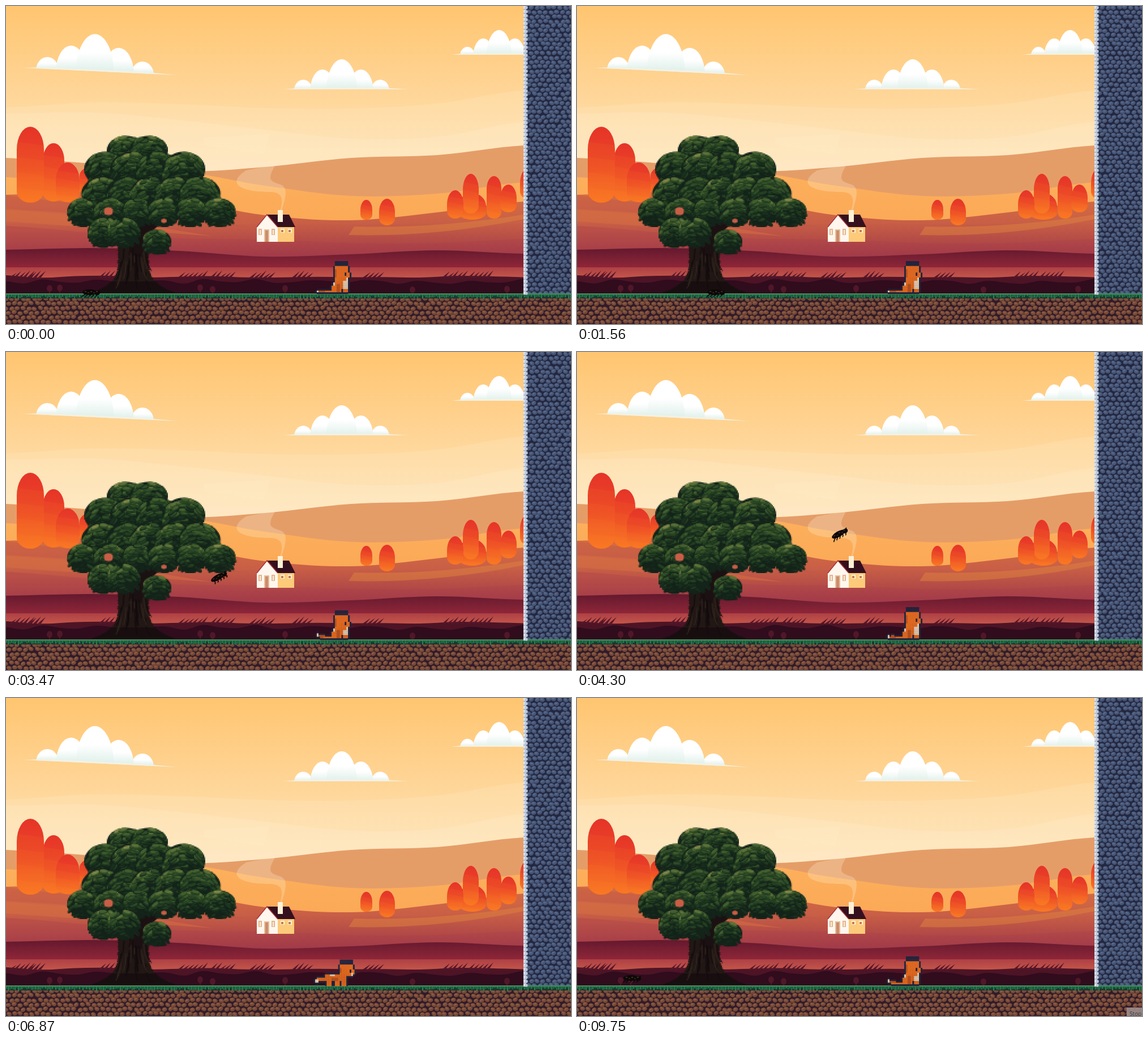
An HTML page with a canvas that plays this animation: 998x561 px, repeating every 9.82 s.

```html
<!DOCTYPE html>
<html lang="en">
<head>
<meta charset="utf-8">
<title>Autumn fox</title>
<style>
html, body { margin: 0; width: 100%; height: 100%; overflow: hidden; background: #2f0c1c; }
canvas { display: block; width: 998px; height: 561px; }
</style>
</head>
<body>
<canvas id="stage" width="998" height="561"></canvas>
<script>
const W = 998, H = 561, FIELD = 914, GRASS = 507, LOOP = 9.82;
const stage = document.getElementById('stage').getContext('2d');

function layer(w, h) {
  const canvas = document.createElement('canvas');
  canvas.width = w;
  canvas.height = h;
  return canvas.getContext('2d');
}

let seed = 7;
function rnd(a = 0, b = 1) {
  seed = (seed * 16807) % 2147483647;
  return a + (b - a) * seed / 2147483647;
}

const scene = layer(W, H);

function fade(y0, y1, ...colors) {
  const g = scene.createLinearGradient(0, y0, 0, y1);
  colors.forEach((c, i) => g.addColorStop(i / (colors.length - 1), c));
  return g;
}

function blob(c, fill, x, y, rx, ry = rx, angle = 0) {
  c.fillStyle = fill;
  c.beginPath();
  c.ellipse(x, y, rx, ry, angle, 0, 7);
  c.fill();
}

function box(c, fill, x, y, w, h) {
  c.fillStyle = fill;
  c.fillRect(x, y, w, h);
}

function poly(c, fill, ...p) {
  c.fillStyle = fill;
  c.beginPath();
  for (let i = 0; i < p.length; i += 2) c.lineTo(p[i], p[i + 1]);
  c.fill();
}

// Smooth slope through evenly spaced heights, filled down to the grass.
function hill(fill, ...heights) {
  const step = FIELD / (heights.length - 1);
  const at = i => heights[Math.max(0, Math.min(heights.length - 1, i))];
  scene.fillStyle = fill;
  scene.beginPath();
  scene.moveTo(0, GRASS);
  scene.lineTo(0, at(0));
  for (let i = 1; i < heights.length; i++) {
    const x = i * step;
    scene.bezierCurveTo(x - step * 2 / 3, at(i - 1) + (at(i) - at(i - 2)) / 6,
      x - step / 3, at(i) - (at(i + 1) - at(i - 1)) / 6, x, at(i));
  }
  scene.lineTo(FIELD, GRASS);
  scene.fill();
}

// Five mounds that shrink away from the middle, on a thin sloping base.
function drawCloud(cx, base, size, slope) {
  const baseAt = x => base + (x - cx) * slope;
  const left = cx - size * 3, right = cx + size * 3.45;
  scene.save();
  scene.beginPath();
  scene.moveTo(left, baseAt(left));
  scene.lineTo(left, 0);
  scene.lineTo(right, 0);
  scene.lineTo(right, baseAt(right));
  scene.clip();
  for (const i of [-2, 2, -1, 1, 0]) {
    const x = cx + i * size, far = Math.abs(i), tall = size * (1.56 - .53 * far), floor = baseAt(x);
    blob(scene, fade(floor - tall, floor, '#fff', '#fff', '#dff0ea'), x, floor + 3, size * (.8 - .16 * far), tall + 3);
  }
  scene.restore();
  poly(scene, '#f4f1e3', left, baseAt(left), cx - size * 2, baseAt(cx - size * 2) - 3,
    cx + size * 2, baseAt(cx + size * 2) - 3, right, baseAt(right));
}

function drawSky() {
  box(scene, fade(0, 290, '#ffc570', '#fee4bb'), 0, 0, W, GRASS);
  hill('#ffefd030', 179, 170, 173, 180, 181, 172, 149);
  hill('#ffefd03c', 190, 188, 201, 218, 234, 231, 204);
  drawCloud(157, 115, 42, .048);
  drawCloud(593, 147, 34, 0);
  drawCloud(871, 86, 28, 0);
}

// `dome` is the share of the height that the rounded top takes.
function redTree(x, y, w, h, dome = .3) {
  scene.fillStyle = fade(y, y + h, '#e63428', '#ea4528', '#f66f23');
  const top = { x: w / 2, y: h * dome }, foot = { x: w / 2, y: h * dome / 2 };
  scene.beginPath();
  scene.roundRect(x, y, w, h, [top, top, foot, foot]);
  scene.fill();
  scene.save();
  scene.clip();
  for (let s = y + h / 5; s < y + h; s += h / 5) {
    poly(scene, '#ff8a2018', x, s, x + w, s + 6, x + w, y + h, x, y + h);
  }
  scene.restore();
}

function drawHills() {
  hill('#e59d68', 268, 278, 292, 284, 268, 263, 246);
  hill(fade(290, 380, '#fdb05c', '#fba957'), 302, 312, 294, 317, 335, 331, 311);
  hill(fade(330, 430, '#d56d42', '#c96046', '#a94147'), 333, 328, 342, 369, 378, 364, 345);
  poly(scene, '#b64c4844', 0, 334, 330, 373, 430, 390, 0, 360);
  poly(scene, '#d7704380', 0, 358, 110, 365, 366, 406, 0, 380);
  scene.fillStyle = '#df813f80';
  scene.beginPath();
  scene.moveTo(FIELD, 368);
  scene.quadraticCurveTo(760, 393, 615, 389);
  scene.lineTo(605, 404);
  scene.quadraticCurveTo(760, 408, FIELD, 376);
  scene.fill();
  hill(fade(395, 440, '#b94f47', '#a33b49'), 388, 400, 410, 412, 418, 418, 411);

  redTree(65, 242, 38, 103);
  redTree(19, 213, 48, 134);
  redTree(130, 285, 34, 48);
  redTree(88, 276, 42, 70, .45);
  redTree(626, 342, 21, 35, .5);
  redTree(659, 340, 28, 47, .5);
  redTree(799, 330, 49, 47, .5);
  redTree(807, 296, 28, 70, .4);
  redTree(779, 325, 29, 50, .5);
  redTree(849, 300, 26, 75);
  redTree(873, 315, 29, 49, .5);
  redTree(908, 287, 25, 53, .5);
}

function drawHouse() {
  scene.fillStyle = '#fff2d444';
  scene.beginPath();
  scene.moveTo(484, 361);
  scene.bezierCurveTo(492, 337, 486, 327, 462, 328);
  scene.bezierCurveTo(408, 327, 392, 311, 424, 290);
  scene.lineTo(476, 280);
  scene.bezierCurveTo(461, 306, 465, 309, 485, 315);
  scene.bezierCurveTo(499, 321, 494, 337, 487, 361);
  scene.fill();
  poly(scene, '#fff2d41c', 348, 232, 466, 226, 456, 261, 352, 246);

  box(scene, '#fcca79', 478, 389, 31, 27);
  poly(scene, '#fff7ee', 443, 416, 443, 390, 461, 368, 480, 390, 480, 416);
  poly(scene, '#34101f', 460, 368, 500, 368, 511, 390, 480, 390);
  scene.strokeStyle = '#a83238';
  scene.lineWidth = 1.5;
  scene.beginPath();
  scene.moveTo(443, 390);
  scene.lineTo(461, 368);
  scene.lineTo(480, 390);
  scene.stroke();
  box(scene, '#fff1d7', 480, 360, 9, 21);
  box(scene, '#e8bd93', 456, 394, 9, 22);
  box(scene, '#ca8c70', 458, 396, 5, 20);
  for (const x of [446, 469]) {
    box(scene, '#e0b694', x, 393, 6, 11);
    box(scene, '#fff1d7', x + 2, 395, 2, 8);
  }
  for (const x of [485, 498]) {
    box(scene, '#fff1d7', x, 393, 7, 7);
    box(scene, '#c47a53', x + 1, 395, 4, 4);
  }
}

function drawMeadow() {
  hill(fade(428, 461, '#65192d', '#7a2034', '#8e2637'), 430, 427, 432, 442, 438, 431, 437);
  box(scene, fade(461, 477, '#ad4045', '#c15349'), 0, 461, W, 18);
  hill('#4d1426', ...Array.from({ length: 16 }, () => rnd(475, 480)));
  for (const start of [5, 40, 163, 303, 360, 430, 505, 630, 770, 815]) {
    const end = start + rnd(20, 45);
    for (let x = start; x < end; x += 8) {
      poly(scene, '#56162a', x, 479, x + 14, 479 - rnd(8, 13), x + 6, 479);
    }
  }
  hill('#300c1d', ...Array.from({ length: 30 }, (_, i) => 486 + 3 * Math.sin(i * 2.1) + rnd(-2, 2)));
  for (const x of [77, 95, 343, 365, 493, 718, 885]) {
    const y = rnd(497, 502);
    blob(scene, '#501729', x, y, 5, 6);
    box(scene, '#501729', x - 1, y, 2, 9);
  }
}

// Staggered pebbles with a lit upper edge.
function stones(x0, y0, x1, y1, dark, body, light) {
  box(scene, dark, x0, y0, x1 - x0, y1 - y0);
  scene.save();
  scene.beginPath();
  scene.rect(x0, y0, x1 - x0, y1 - y0);
  scene.clip();
  for (let row = 0, y = y0 + 3; y < y1 + 5; y += 8, row++) {
    for (let x = x0 + (row % 2) * 5; x < x1 + 6; x += 10) {
      const px = x + rnd(-1, 1), py = y + rnd(-1.3, 1.3), angle = rnd(-.6, .6);
      blob(scene, body, px, py, 4.6, 3.7, angle);
      blob(scene, light, px - .8, py - 1, 2.8, 1.5, angle);
    }
  }
  scene.restore();
}

function drawGround() {
  stones(0, 514, W, H, '#2f1b2a', '#754836', '#8c5b44');
  box(scene, '#183b32', 0, GRASS, W, 9);
  for (let x = 0; x < W; x += 3) {
    box(scene, x % 2 ? '#2e8350' : '#26704a', x, GRASS, 2, rnd(4, 10));
  }
  box(scene, '#3d9258', 0, GRASS, W, 2);
  stones(918, 0, W, GRASS, '#23273f', '#465575', '#57678a');
  box(scene, '#aeb9cc', FIELD, 0, 5, GRASS);
  for (let y = 0; y < GRASS; y += 7) {
    box(scene, '#dce2eb', FIELD, y, 4, 5);
    blob(scene, '#bdc8d9', 919, y + 3, 2.6, 2.7);
  }
}

const GREENS = ['#14241a', '#1a301e', '#243f21', '#324f28', '#435f2f', '#5c7138', '#7d8446'];

// Leaves fan out from the crown of each clump and brighten towards its top.
function drawClump(c, x, y, rx, ry) {
  blob(c, GREENS[0], x, y, rx, ry);
  const count = rx * 2;
  for (let i = 0; i < count; i++) {
    const dy = 1 - 2 * i / count, dx = rnd(-1, 1) * Math.sqrt(1 - dy * dy);
    const light = 2.7 - dy * 2.3 - dx * .6 + rnd(-1.3, 1.3);
    const shade = Math.max(0, Math.min(6, Math.floor(light)));
    const px = x + dx * rx * .95, py = y + dy * ry * .92, angle = dx * 1.1;
    blob(c, GREENS[Math.max(0, shade - 2)], px, py + 2, 8, 3, angle);
    blob(c, GREENS[shade], px, py, 7, 2.6, angle);
  }
}

function drawOak() {
  const oak = layer(155, 145);
  oak.scale(.5, .5);
  oak.translate(-100, -222);
  for (let y = 424; y < 506; y += 2) {
    const half = 27 + 52 * ((y - 424) / 82) ** 5 + rnd(-1, 1);
    box(oak, y < 485 ? '#211714' : '#180e10', 225 - half, y, half * 2, 2);
  }
  oak.strokeStyle = '#1b1112';
  oak.lineWidth = 22;
  for (const [x, y] of [[200, 355], [245, 350], [286, 362]]) {
    oak.beginPath();
    oak.moveTo(228, 440);
    oak.quadraticCurveTo(236, 390, x, y);
    oak.stroke();
  }
  oak.lineWidth = 2;
  for (let i = 0; i < 24; i++) {
    const x = rnd(201, 248), y = rnd(425, 470);
    oak.strokeStyle = i % 3 ? '#120b0d' : '#30231d';
    oak.beginPath();
    oak.moveTo(x, y);
    oak.quadraticCurveTo(x, y + 20, x + (x - 224) * .4, y + 32);
    oak.stroke();
  }
  blob(oak, GREENS[0], 245, 318, 85, 55);
  const rows = [
    { y: 255, from: 212, to: 252, n: 2, rx: 34, ry: 26 },
    { y: 288, from: 176, to: 314, n: 4, rx: 38, ry: 31 },
    { y: 331, from: 170, to: 342, n: 5, rx: 37, ry: 29 },
    { y: 363, from: 137, to: 376, n: 6, rx: 29, ry: 24 },
    { y: 399, from: 173, to: 208, n: 2, rx: 29, ry: 25 },
    { y: 415, from: 267, to: 267, n: 1, rx: 25, ry: 20 }
  ];
  for (const { y, from, to, n, rx, ry } of rows) {
    for (let i = 0; i < n; i++) drawClump(oak, from + (to - from) * i / Math.max(1, n - 1), y, rx, ry);
  }
  oak.globalCompositeOperation = 'destination-out';
  blob(oak, '#000', 181, 362, 8, 7);
  blob(oak, '#000', 279, 379, 5, 4);
  scene.imageSmoothingEnabled = false;
  scene.drawImage(oak.canvas, 100, 222, 310, 290);
}

drawSky();
drawHills();
drawHouse();
drawMeadow();
drawGround();
drawOak();

const INK = '#20243c', FUR = '#df691f', RUST = '#b85220', CREAM = '#e2cbb0';
const CELL = 2.9;

const part = (color, x, y, rx, ry) => ({ color, x, y, rx, ry });
const covers = (p, x, y) => ((x - p.x) / p.rx) ** 4 + ((y - p.y) / p.ry) ** 4 < 1;

// Rasterises rounded parts to coarse cells and inks the cells along their edge.
function drawPixels(parts) {
  const solid = parts.filter(p => p.color !== INK);
  const near = (x, y) => solid.some(p => covers(p, x, y));
  for (let row = 0; row < 20; row++) {
    for (let col = -2; col < 25; col++) {
      const x = col + .5, y = row + .5;
      const hit = parts.findLast(p => covers(p, x, y));
      const edge = near(x - 1, y) || near(x + 1, y) || near(x, y + 1) || near(x, y - 1);
      if (hit || edge) box(stage, hit ? hit.color : INK, 549 + col * CELL, 450 + row * CELL, CELL + .2, CELL + .2);
    }
  }
}

function foxHead(x, y, tall) {
  const ears = [-3, -1, 1, 3].map(dx => part(INK, x + dx, y - tall - 1, .6, 1.6));
  return [
    part(FUR, x, y, 4.2, tall),
    part(FUR, x + 4, y + 1, 1, 1.6),
    part(RUST, x - 3.5, y, .6, tall - 2),
    part(INK, x + 2.5, y + .5, .6, 1.1),
    part(CREAM, x + 3.5, y + tall - 1.5, .6, 1.1),
    ...ears
  ];
}

function drawSitting(time) {
  const phase = (time / 1.5) % 1;
  const drop = phase > .22 && phase < .65 ? 2 : 0;
  const tip = 18.5 - 1.6 * Math.sin(Math.PI * phase);
  drawPixels([
    part(FUR, 6, 18.5, 4, .9),
    part(RUST, 3, (tip + 18.5) / 2, 1.6, .7),
    part(CREAM, .6, tip, .8, .7),
    part(FUR, 15, 14.5, 4, 5),
    part(FUR, 11, 17, 2.2, 2.4),
    part(RUST, 13, 16.5, 1.1, 2.4),
    part(CREAM, 17.5, 14.5, 1.6, 2.6),
    part(CREAM, 10.5, 14, .6, 1.1),
    part(INK, 15.5, 18.5, .6, 1.6),
    ...foxHead(15, 7.5 + drop, 5)
  ]);
}

function drawStanding(time) {
  const lean = Math.min(2.4, time * 1.6);
  const tip = Math.floor(time * 3) % 2 ? 14.5 : 17;
  const legs = [7.5, 12.5, 16.5].map(x => part(FUR, x, 18, 1.1, 2));
  drawPixels([
    part(FUR, 2.5, (tip + 15) / 2, 2.2, .9),
    part(CREAM, 0, tip, .8, .8),
    part(FUR, 11.5, 15, 7, 2.1),
    ...legs,
    part(RUST, 11, 16, 2.1, 1.1),
    part(CREAM, 9.5, 13.5, 1.6, .7),
    ...foxHead(15.7 + lean, 10.5, 4)
  ]);
}

function drawFox(t) {
  const pounce = 5.39, rest = 7.37;
  if (t < pounce) drawSitting(t);
  else if (t < rest) drawStanding(t - pounce);
  else drawSitting(t - rest);
}

function bugPose(t) {
  if (t < 3.15) return [150 + 61 * t, 506, 0];
  if (t < 5.33) {
    const s = t - 4.08;
    return [342 + 106 * (t - 3.15), 316 + (s < 0 ? 220 : 108) * s * s, -.52];
  }
  return t > 7.66 ? [97 + 62 * (t - 9.75), 495, 0] : null;
}

function drawBug(t) {
  const pose = bugPose(t);
  if (!pose) return;
  const c = stage, [x, y, angle] = pose, stride = Math.floor(t * 8) % 2 ? 2 : -2;
  c.save();
  c.translate(x, y);
  c.rotate(angle);
  c.strokeStyle = '#0c0808';
  c.lineWidth = 1.6;
  c.beginPath();
  for (let i = -2; i <= 2; i++) {
    const foot = i * 6 + stride;
    c.moveTo(i * 5, 2);
    c.lineTo(foot, 5);
    c.lineTo(foot - 2, 7);
  }
  c.moveTo(12, -2);
  c.lineTo(16, -4);
  c.stroke();
  blob(c, '#0c0808', -2, -1, 13, 5);
  blob(c, '#0c0808', 11, 0, 5, 4);
  for (let i = 0; i < 5; i++) box(c, i % 2 ? '#3b2919' : '#51351f', -11 + i * 5, -3 + i % 2 * 2, 3, 1.6);
  c.restore();
}

function drawStop() {
  box(stage, '#9b8e8ee0', 971, 546, 27, 15);
  stage.fillStyle = '#403a3d';
  stage.font = '10px "Open Sans", sans-serif';
  stage.fillText('Stop', 976, 561);
}

const start = performance.now();
function frame() {
  const t = ((performance.now() - start) / 1000) % LOOP;
  stage.drawImage(scene.canvas, 0, 0);
  drawFox(t);
  drawBug(t);
  if (t >= 9.74) drawStop();
  requestAnimationFrame(frame);
}
frame();
</script>
</body>
</html>
```
